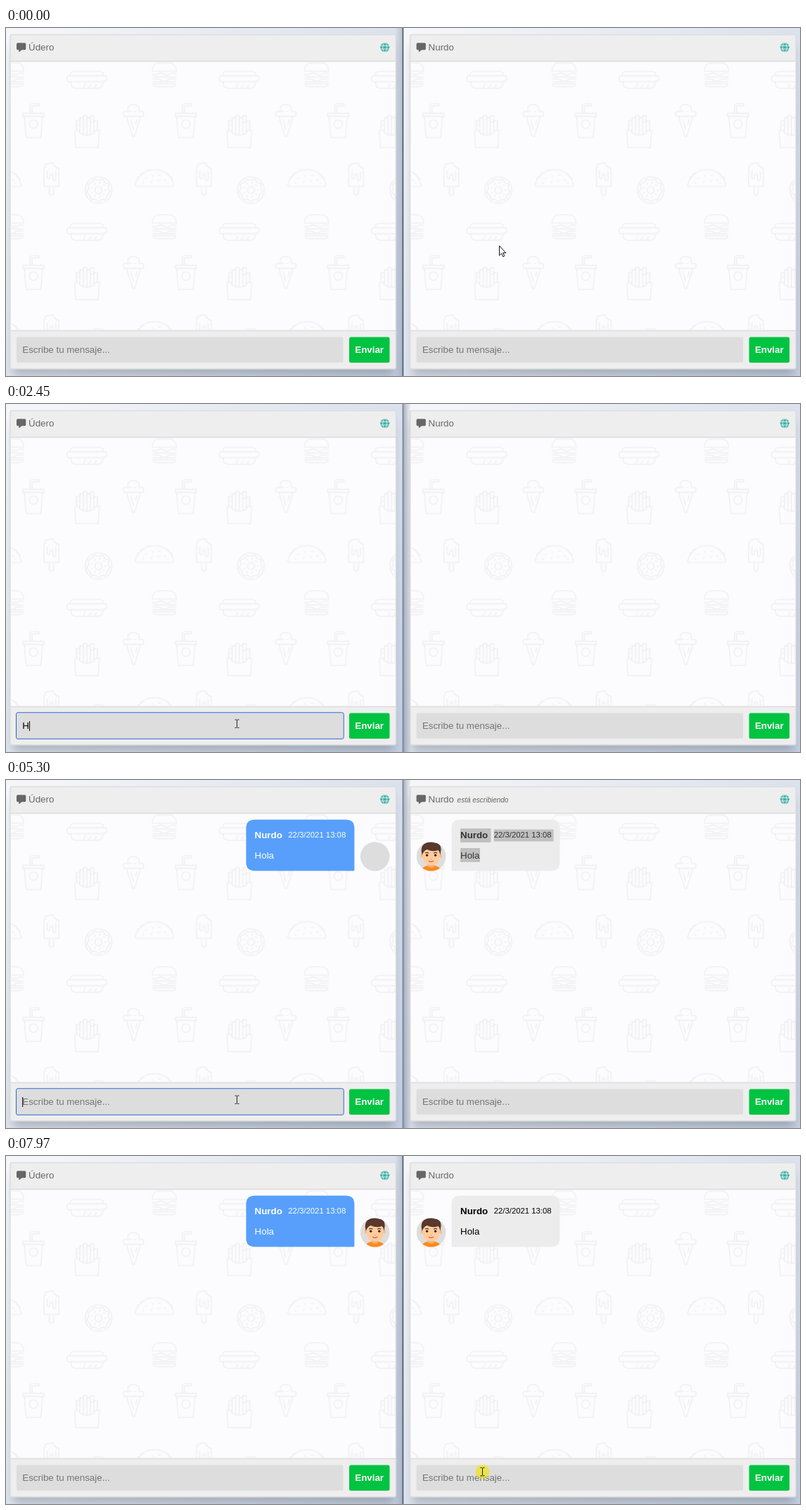
Animation of 1129x496 px, one loop 8 s. Source, as an HTML page:

```html
<!DOCTYPE html>
<html lang="es">
<head>
<meta charset="utf-8">
<title>Chat</title>
<style>
html, body { margin: 0; width: 100%; height: 100%; overflow: hidden; }
svg { display: block; width: 100%; height: 100%; }
text { font: 13.33px "Liberation Sans", Arial, sans-serif; white-space: pre; }
.bold { font-weight: bold; }
.date { font-size: 11.33px; }
.status { font-size: 10px; font-style: italic; }
</style>
</head>
<body>
<svg id="stage" viewBox="0 0 1129 496" preserveAspectRatio="none"></svg>
<script>
const stage = document.getElementById('stage');
const LEFT_NAME = 'Údero', RIGHT_NAME = 'Nurdo';
const RIGHT_X = 568.6;

const at = (x, y, body) => `<g transform="translate(${x} ${y})">${body}</g>`;
const path = (d, attrs = '') => `<path d="${d}" ${attrs}/>`;
const label = (x, y, text, attrs = '') => `<text x="${x}" y="${y}" ${attrs}>${text}</text>`;
const box = (x, y, w, h, attrs) => `<rect x="${x}" y="${y}" width="${w}" height="${h}" ${attrs}/>`;

// Donut icing edge: a circle with a gentle ripple
const icing = Array.from({ length: 73 }, (_, i) => {
  const a = i / 72 * 2 * Math.PI, r = 15.3 + 1.2 * Math.sin(a * 9);
  return `${(r * Math.cos(a)).toFixed(1)} ${(r * Math.sin(a)).toFixed(1)}`;
}).join('L');
const sprinkles = Array.from({ length: 9 }, (_, i) =>
  `<path d="M9 -1l2 2" transform="rotate(${i * 40})"/>`).join('');

const food = [
  // burger
  at(225, 48.5, path(`M-17 13Q-17 1-5 1H5Q17 1 17 13ZM-18 17Q-13 20-9 17T0 17T9 17T18 17
    M-17 21H17M-17 24H-8L0 28 8 24H17M-17 28H17M-16 31H16V32Q16 35 11 35H-11Q-16 35-16 32Z`)),
  // hot dog
  at(115, 61, path(`M-24 7Q-24 1-18 1H18Q24 1 24 7M-24 7H24Q28.5 7 28.5 11T24 15.5H-24Q-28.5 15.5-28.5 11T-24 7Z
    M-23 16Q-23 25-15 25H15Q23 25 23 16M-5 24l3-5M3 24l3-5M11 24l3-5`)),
  // cup
  at(255.7, 107, path(`M-15 14.5H15V19H-15ZM-13 19L-10.5 49H10.5L13 19M-2 14V6Q-2 4 0 4H8V0.8H-1Q-5 1-5 5V14`)
    + '<circle cy="30" r="6"/>'),
  // ice cream cone
  at(181.3, 108, path(`M-8 8Q-8 1 0 1T8 8V11H11Q14.5 11 14.5 14.5T11 18H-11Q-14.5 18-14.5 14.5T-11 11H-8Z
    M-10 18L-2 45Q0 48 2 45L10 18M-8 11H-3M1 11H4M-4 22L0 37M5 22L3 29`)),
  // fries
  at(115, 124, path(`M-17.5 22H-12Q-9 29 0 29T12 22H17.5L16 46.5H-16Z
    M-15 22V8H-10V24M-10 10V4H-5V28M-5 4V1H0V29M0 4H5V28M5 6V1H10V25M10 8H15V22M-10 14H-15M5 10H10`)),
  // popsicle
  at(281.3, 191, path(`M-10.5 35V10Q-10 2-3 2Q1 0 3 2Q2 5 5 5Q6 9 10.5 9V35Z
    M-3 36V46Q0 48.5 3 46V36M-6 12V22Q-4 25-2 22V18Q0 15 2 18V25Q4 28 6 25V13`)),
  // donut
  at(131.5, 231, `<circle r="19"/><circle r="5"/>${path('M' + icing + 'Z')}${sprinkles}`),
  // taco
  at(211.3, 201, path(`M-27 21Q-20 1 0 1T27 21Q28 25 24 25H-24Q-28 25-27 21Z
    M-25 15Q-24 11-21 11Q-20 6-15 6M25 15Q24 11 21 11Q20 6 15 6
    M-14 14l3-1M-4 9l2 2M6 8l3 1M14 15l2 2M-18 20l3 0M-6 18l3 1M4 17l3-1M18 21l2-1`)),
].join('');

const defs = `<defs>
  <linearGradient id="page" gradientUnits="userSpaceOnUse" x1="16.7" y1="-16.7" x2="546.3" y2="512.7">
    <stop stop-color="#f5f7fa"/><stop offset="1" stop-color="#c3cfe2"/></linearGradient>
  <linearGradient id="fadeRight"><stop stop-color="#34445c" stop-opacity=".38"/>
    <stop offset="1" stop-color="#34445c" stop-opacity="0"/></linearGradient>
  <linearGradient id="fadeLeft"><stop stop-color="#34445c" stop-opacity="0"/>
    <stop offset="1" stop-color="#34445c" stop-opacity=".2"/></linearGradient>
  <pattern id="food" patternUnits="userSpaceOnUse" x="79" y="47.7" width="216.67" height="216.67">
    <g transform="translate(-79 -47.7)" fill="none" stroke="#f0f0f1" stroke-width="1.6" stroke-linejoin="round">${food}</g>
  </pattern>
  <filter id="soft" x="-10%" y="-10%" width="120%" height="120%"><feGaussianBlur stdDeviation="6.2"/></filter>
  <clipPath id="disc"><circle r="20.8"/></clipPath>
</defs>`;

const globe = at(538.7, 27.6, `<circle r="6.6" fill="#42b5aa"/>
  <g fill="none" stroke="#eee" stroke-width=".9"><ellipse rx="3" ry="6.6"/>${path('M-7-2.3H7M-7 2.3H7')}</g>`);

const panel = (x, name, id) => at(x, 0, `
  ${box(x ? -3 : 0, 0, 567, 496, 'fill="url(#page)"')}
  ${box(9.2, 25.4, 542, 469.4, 'filter="url(#soft)" opacity=".2"')}
  ${box(5.3, 8.7, 549.9, 478, 'rx="4" fill="#ddd"')}
  ${box(6.8, 10.3, 547, 474.8, 'rx="2.5" fill="#eee"')}
  ${box(6.8, 46.6, 547, 385.6, 'fill="#ddd"')}
  ${box(6.8, 48.2, 547, 382.4, 'fill="#fcfcfe"')}
  ${box(6.8, 48.2, 547, 382.4, 'fill="url(#food)"')}
  ${path('M16.7 21.2H26.7Q28.3 21.2 28.3 22.8V29.6Q28.3 31.2 26.7 31.2H22.4L18.3 34.4V31.2H16.7Q15 31.2 15 29.6V22.8Q15 21.2 16.7 21.2Z', 'fill="#666"')}
  ${label(32, 32.4, name, 'fill="#666"')}
  ${globe}
  ${box(15, 440.5, 464.5, 36.3, 'rx="2.5" fill="#ddd"')}
  ${label(23.3, 462.6, 'Escribe tu mensaje...', `fill="#757575" id="hint${id}"`)}
  ${box(488, 440.5, 57.5, 36.5, 'rx="2.5" fill="#00c441"')}
  ${label(496.3, 462.8, 'Enviar', 'fill="#fff" class="bold"')}`);

const face = `<g clip-path="url(#disc)">
  ${path('M-14 21Q-13 14-5 13H5Q13 14 14 21Z', 'fill="#ff8a1c"')}
  ${path('M-5 8H5V14Q0 18-5 14Z', 'fill="#f3b27c"')}
  <circle cx="-12.5" cy="-1" r="2.8" fill="#f9bd88"/><circle cx="12.5" cy="-1" r="2.8" fill="#f9bd88"/>
  ${path('M-12-11H12V0Q11 12.5 0 12.5T-12 0Z', 'fill="#ffcc9b"')}
  ${path('M-13-2Q-16-13-10-18Q-3-22 5-19.5Q14-19 14-10L13-2Q12-7 10-9Q2-6-6-10Q-11-8-13-2Z', 'fill="#59382d"')}
  ${path('M-8.5-4.8Q-6-6.4-3.5-4.8M3.5-4.8Q6-6.4 8.5-4.8', 'fill="none" stroke="#59382d" stroke-width="1.3"')}
  <circle cx="-6" cy="-1.7" r="1.7" fill="#3a2823"/><circle cx="6" cy="-1.7" r="1.7" fill="#3a2823"/>
  ${path('M-1 3Q0 4 1 3', 'fill="none" stroke="#e59b69"')}
  ${path('M-3.5 6.3Q0 9 3.5 6.3', 'fill="none" stroke="#c65b4a" stroke-width="1.2"')}
</g>`;
const avatar = (x, id) => at(x, 109, `<circle r="20.8" fill="#ddd"/><g id="${id}">${face}</g>`);
const message = (x, id) => `<g id="${id}">
  ${label(x, 83, RIGHT_NAME, 'class="bold"')}
  ${label(x + 47.7, 82.4, '22/3/2021 13:08', 'class="date"')}
  ${label(x, 111.6, 'Hola')}</g>`;

stage.innerHTML = defs + panel(0, LEFT_NAME, 'L') + panel(RIGHT_X, RIGHT_NAME, 'R') + `
  ${box(553, 0, 11, 496, 'fill="url(#fadeLeft)" id="shadeL"')}
  ${box(565, 0, 11, 496, 'fill="url(#fadeRight)" id="shadeR"')}
  ${box(563.6, 0, 1.6, 496, 'id="divider"')}
  ${label(RIGHT_X + 73, 32.2, 'está escribiendo', 'class="status" fill="#666" id="status"')}
  ${box(14.5, 439.8, 465.7, 37.5, 'rx="2.5" fill="none" stroke="#2a62d0" id="focus"')}
  ${label(23.3, 462.6, '', 'id="typed"')}
  ${box(0, 452, 1, 14, 'id="caret"')}
  <g id="chat">
    ${path('M354 56.6H483Q495.4 56.6 495.4 69V129.5H354Q341.4 129.5 341.4 117V69Q341.4 56.6 354 56.6Z', 'fill="#579ffb"')}
    <g fill="#fff">${message(353.6, 'sent')}</g>
    ${avatar(524.7, 'sentFace')}
    ${path('M646 56.6H775Q787.5 56.6 787.5 69V117Q787.5 129.5 775 129.5H633.6V69Q633.6 56.6 646 56.6Z', 'fill="#ececec"')}
    <g id="selection" fill="#c0c0c0">${box(646, 69, 43.5, 20, '')}${box(693.7, 70.5, 84.8, 17, '')}${box(646, 97, 28, 20, '')}</g>
    ${message(646, 'received')}
    ${avatar(604.6, 'receivedFace')}
  </g>
  <g id="pointer">
    <circle id="press" r="10" fill="#f2e600" opacity=".65"/>
    ${path('M.5.5V14.2L3.6 11.3 5.7 16 7.8 15 5.7 10.5H9.8Z', 'id="arrow" fill="#fff" stroke="#111"')}
    ${path('M-3-5.7H-.8L0-5 .8-5.7H3M0-5V5M-3 5.7H-.8L0 5 .8 5.7H3', 'id="beam" fill="none" stroke="#222"')}
  </g>`;

const $ = Object.fromEntries([...stage.querySelectorAll('[id]')].map(e => [e.id, e]));
const show = (el, on) => el.setAttribute('visibility', on ? 'inherit' : 'hidden');
const during = (t, ...spans) => spans.some(([from, to]) => t >= from && t < to);

// Pointer legs: start, end, from x, from y, to x, to y
const legs = [
  [250, 1050, 701, 310, 328.4, 455.7],
  [6400, 6680, 328.4, 455.7, 665, 358],
  [6680, 6880, 665, 358, 676, 364],
  [7240, 7970, 676, 364, 677.5, 450],
];
const ease = (p, n) => p < .5 ? (2 * p) ** n / 2 : 1 - (2 - 2 * p) ** n / 2;
function pointerAt(t) {
  const leg = legs.findLast(l => t >= l[0]) || legs[0];
  const p = Math.min(1, Math.max(0, (t - leg[0]) / (leg[1] - leg[0])));
  const e = ease(p, leg === legs[0] ? 4 : 2);
  return [leg[2] + (leg[4] - leg[2]) * e, leg[3] + (leg[5] - leg[3]) * e];
}

const keyTimes = [2450, 2680, 2890, 3070];
function render(t) {
  const leftActive = during(t, [1370, 7000]);
  const typed = t < 3900 ? 'Hola'.slice(0, keyTimes.filter(k => t >= k).length) : '';
  if ($.typed.textContent !== typed) $.typed.textContent = typed;
  show($.hintL, !typed);
  show($.focus, leftActive);
  show($.shadeL, !leftActive);
  show($.shadeR, leftActive);
  $.divider.setAttribute('fill', leftActive ? '#75839a' : '#4d5866');

  show($.caret, during(t, [1470, 2000], [2450, 3600], [3900, 4420], [4930, 5460], [5980, 6500]));
  $.caret.setAttribute('x', 23.2 + (typed ? $.typed.getComputedTextLength() + .2 : 0));

  show($.status, during(t, [2520, 6090]));
  show($.chat, t >= 5300);
  show($.sentFace, t >= 5820);
  show($.selection, t < 7000);
  $.received.setAttribute('fill', t < 7000 ? '#333' : '#000');

  const [x, y] = pointerAt(t);
  const overInput = y > 440 && (x < 480 || x > 584);
  $.pointer.setAttribute('transform', `translate(${x} ${y})`);
  show($.arrow, !overInput);
  show($.beam, overInput);
  show($.press, during(t, [1300, 1530], [6940, 7240], [7970, 8000]));
}

const start = performance.now();
function tick() {
  render((performance.now() - start) % 8000);
  requestAnimationFrame(tick);
}
tick();
</script>
</body>
</html>
```
